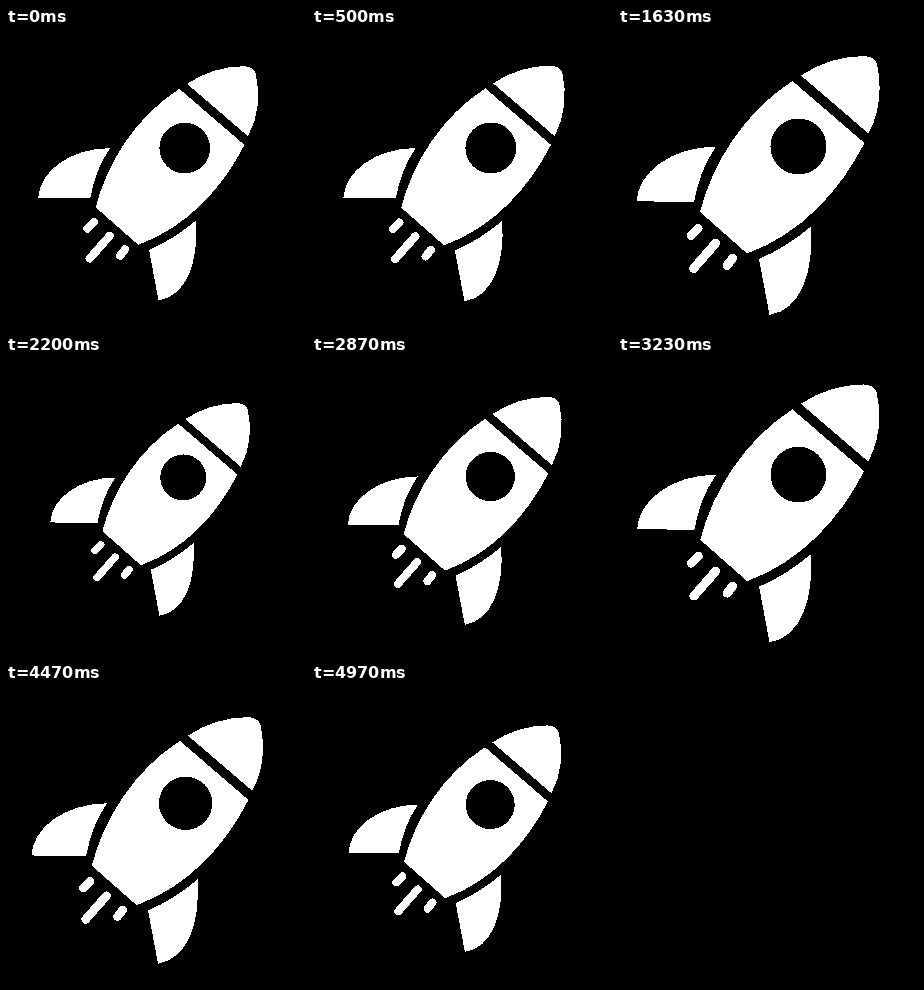
Animation of 300x300 px, one loop 5010 ms. Source, as an HTML page:

```html
<!DOCTYPE html>
<html lang="en">
<head>
<meta charset="utf-8">
<title>Rocket</title>
<style>
  html, body { margin: 0; width: 100%; height: 100%; overflow: hidden; background: #000; }
  svg { display: block; width: 100vw; height: 100vh; }
</style>
</head>
<body>
<svg viewBox="0 0 300 300" shape-rendering="crispEdges">
  <g id="rocket" fill="#fff">
    <path d="M183 47.5 C201 35 224 28 246 28 Q256.5 28.5 259 36 C264 58 262.5 84 250.5 105.5 Z"/>
    <path d="M174.5 53 L246.5 115 C222 163 183 206 129 225.5 L82 184 C94 136 126 84 174.5 53 Z"/>
    <circle cx="180.5" cy="118.5" r="28" fill="#000"/>
    <path d="M98 118.5 C86 136 80 153 76 174 L18.5 173.3 C20 145 52 119 98 118.5 Z"/>
    <path d="M141 231 C160 223 177 212 193 198.5 C196 244 183 282 151.5 287 Z"/>
    <path d="M73 207.5 L80 200.5 M75.5 240.5 L97.5 215.5 M109 237.5 L114.5 230.5"
          fill="none" stroke="#fff" stroke-width="9" stroke-linecap="round"/>
  </g>
</svg>
<script>
  const LOOP = 5010, PULSE = 1460, RISE = 650, LEAD = 420;
  const FAR = 5.6, NEAR = 3.95, UNIT = 1000 / 244;
  const rocket = document.getElementById('rocket');

  // The rocket moves at steady speed in depth, so its size is 1 / depth.
  function depth(t) {
    const p = (t + LEAD) % PULSE;
    const closeness = p < RISE ? p / RISE : (PULSE - p) / (PULSE - RISE);
    return FAR + (NEAR - FAR) * closeness;
  }

  function draw() {
    const scale = UNIT / depth(performance.now() % LOOP);
    rocket.setAttribute('transform',
      `translate(162.3 135) scale(${scale}) translate(-162.3 -135)`);
    requestAnimationFrame(draw);
  }

  draw();
</script>
</body>
</html>
```
